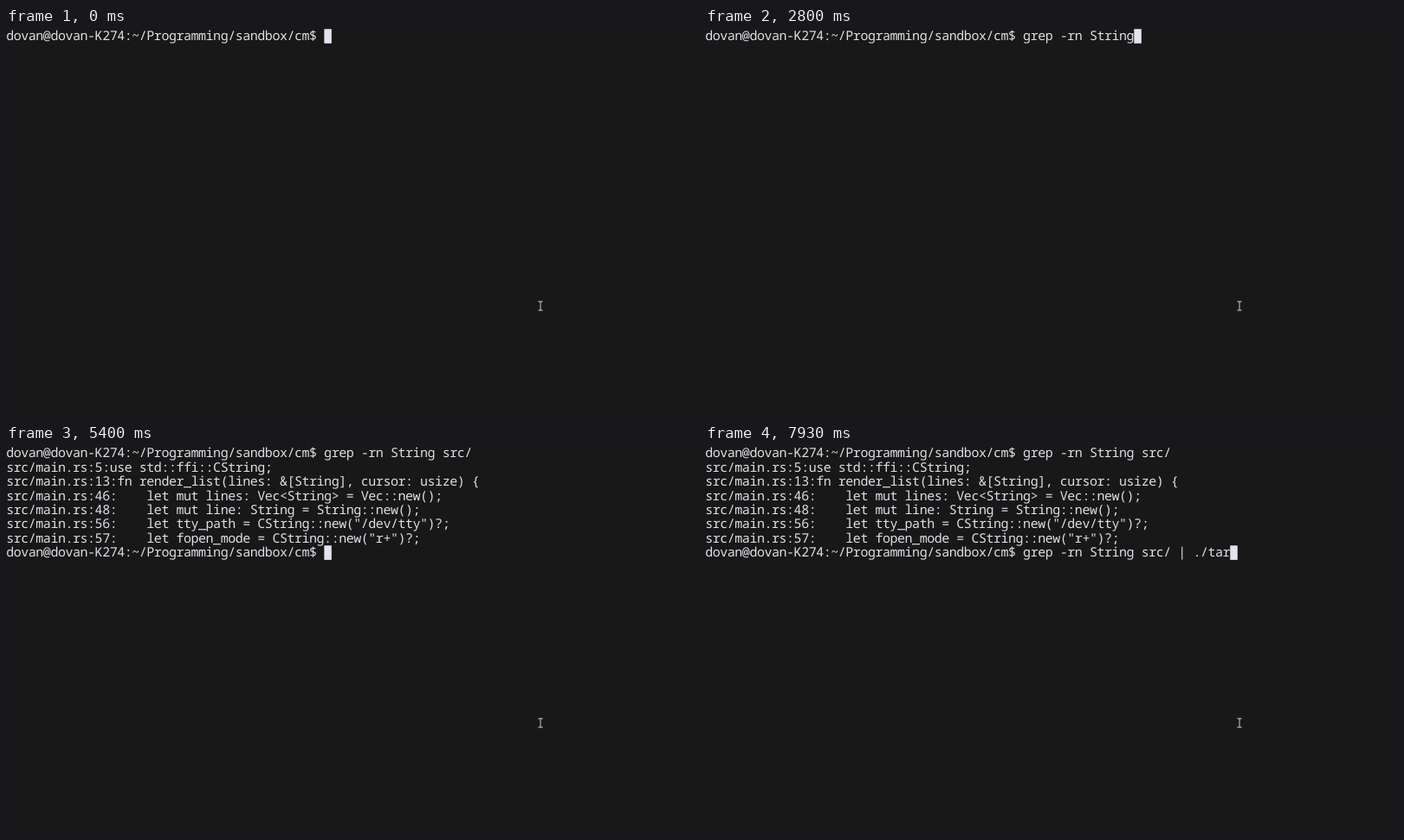
An HTML page for the animation above (8 s loop, 800 by 450 pixels).

```html
<!DOCTYPE html>
<html lang="en">
<head>
<meta charset="utf-8">
<title>Terminal session</title>
<style>
  html, body { margin: 0; width: 100%; height: 100%; overflow: hidden; background: #181818; }
  svg { display: block; width: 100vw; height: 100vh; }
  text {
    font: 15px "Noto Sans Mono", "DejaVu Sans Mono", monospace;
    fill: #dedee6;
    white-space: pre;
    text-rendering: geometricPrecision;
  }
</style>
</head>
<body>
<svg viewBox="0 0 800 450">
  <rect width="800" height="450" fill="#181818"/>
  <g id="screen"></g>
  <rect id="caret" width="8.5" height="16.6" fill="#e4e4ef"/>
  <path d="M614.5 316.5H619.5M614.5 326.5H619.5M617 316.5V326.5" fill="none" stroke="#a2a2a2" stroke-width="1.3"/>
</svg>
<script>
const LOOP = 8000, CELL_W = 8.533, CELL_H = 16.44;
const CARET_X = 0.4, CARET_Y = 1.2, TEXT_X = 0.2, BASELINE = 14.2;
const PROMPT = 'dovan@dovan-K274:~/Programming/sandbox/cm$ ';
const COMMAND = 'grep -rn String src/';
const PIPE = ' | ./tar';
const OUTPUT = [
  'src/main.rs:5:use std::ffi::CString;',
  'src/main.rs:13:fn render_list(lines: &[String], cursor: usize) {',
  'src/main.rs:46:    let mut lines: Vec<String> = Vec::new();',
  'src/main.rs:48:    let mut line: String = String::new();',
  'src/main.rs:56:    let tty_path = CString::new("/dev/tty")?;',
  'src/main.rs:57:    let fopen_mode = CString::new("r+")?;'
];

// Key press times in ms, one per character.
const COMMAND_KEYS = [270, 600, 730, 870, 1070, 1270, 1530, 1730, 1930, 2270,
  2470, 2530, 2670, 2730, 2800, 2930, 3130, 3270, 3600, 3730];
const PIPE_KEYS = [6270, 6330, 6470, 6930, 7130, 7400, 7800, 7930];
const ENTER = 4130, RECALL = 5930;

const screen = document.getElementById('screen');
const caret = document.getElementById('caret');

const rows = Array.from({ length: OUTPUT.length + 2 }, (_, row) => {
  const el = document.createElementNS('http://www.w3.org/2000/svg', 'text');
  el.setAttribute('y', BASELINE + row * CELL_H);
  return screen.appendChild(el);
});

const typed = (text, keys, t) => text.slice(0, keys.filter(k => k <= t).length);

function linesAt(t) {
  const first = PROMPT + typed(COMMAND, COMMAND_KEYS, t);
  if (t < ENTER) return [first];
  const recalled = t < RECALL ? '' : COMMAND;
  return [first, ...OUTPUT, PROMPT + recalled + typed(PIPE, PIPE_KEYS, t)];
}

// Every character sits in its own terminal cell.
function setRow(el, text) {
  if (el.textContent === text) return;
  el.textContent = text;
  el.setAttribute('x', Array.from(text, (_, i) => (TEXT_X + i * CELL_W).toFixed(2)).join(' '));
}

function draw(t) {
  const lines = linesAt(t);
  rows.forEach((el, i) => setRow(el, lines[i] || ''));
  const row = lines.length - 1;
  caret.setAttribute('x', CARET_X + lines[row].length * CELL_W);
  caret.setAttribute('y', CARET_Y + row * CELL_H);
}

function tick() {
  draw(performance.now() % LOOP);
  requestAnimationFrame(tick);
}
tick();
</script>
</body>
</html>
```
